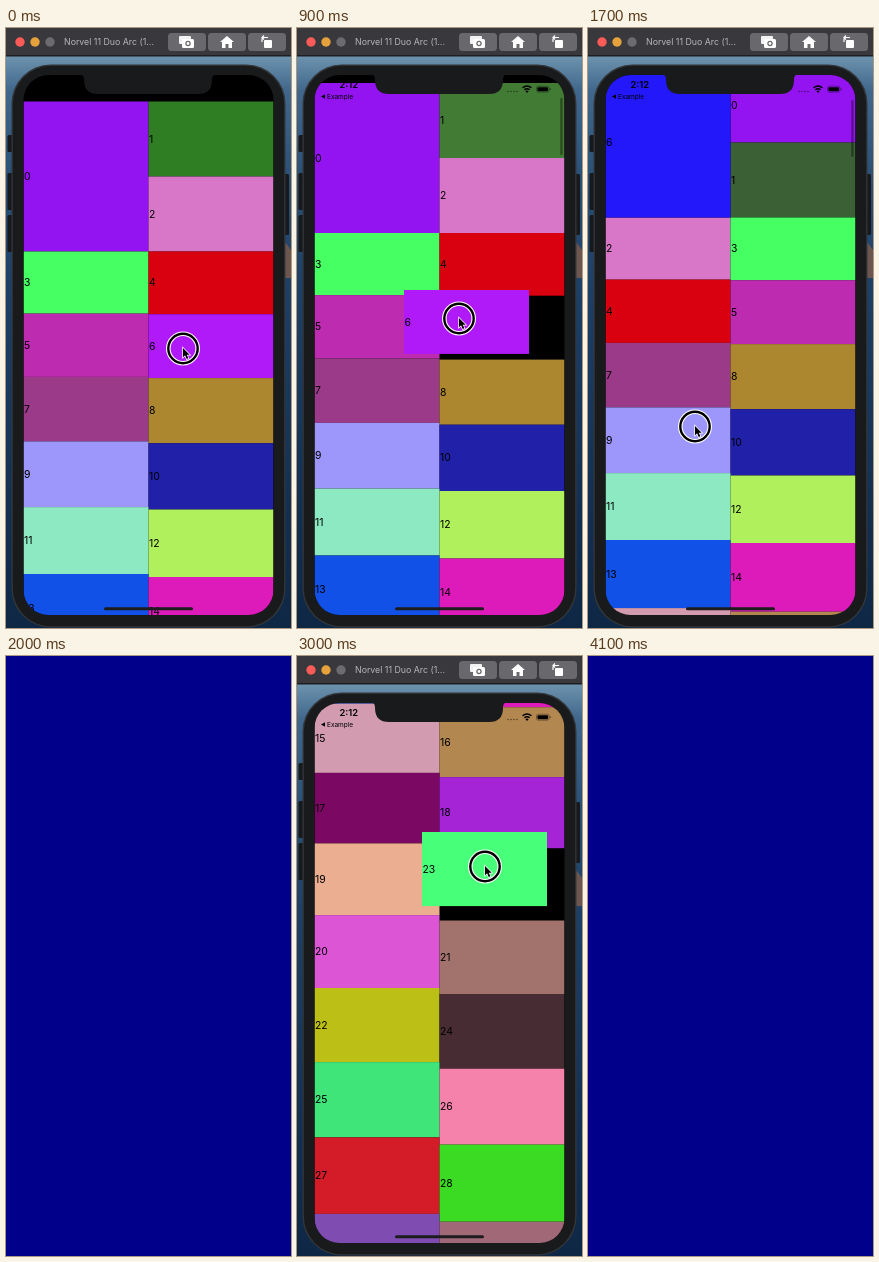
Animation of 285 by 600 pixels, one loop 5.1 s. Source, as an HTML page with a canvas:

```html
<!DOCTYPE html>
<html lang="en">
<head>
<meta charset="utf-8">
<title>Grid reorder</title>
<style>
html, body { margin: 0; overflow: hidden; background: #00008b; }
canvas { display: block; }
</style>
</head>
<body>
<canvas id="stage" width="285" height="600"></canvas>
<script>
const g = document.getElementById('stage').getContext('2d');
const FONT = 'Inter, Roboto, sans-serif';
const LOOP = 5100, LEFT = 17.5, COL = 125;

const colors = ('9314f0 2f7e24 d877c8 46ff63 d9000f bd2bb0 b01af8 9c3a8a ac8730 9d97fc 2120a8 ' +
  '8ce9c2 b0f05d 1151e8 dd1bbb d29bb0 b28750 7b0863 a424d6 ecae90 dc55d5 a2736c bcc016 48ff7a ' +
  '472c34 40e57a f582ab d31c28 3adb22 7f4cb2 a16878').split(' ').map(c => '#' + c);

// Keyframes are [time, value, value, ...]
function track(keys, t) {
  if (t <= keys[0][0]) return keys[0].slice(1);
  for (let i = 1; i < keys.length; i++) {
    const a = keys[i - 1], b = keys[i];
    if (t <= b[0]) {
      const k = (t - a[0]) / (b[0] - a[0]);
      return a.slice(1).map((v, j) => v + (b[j + 1] - v) * k);
    }
  }
  return keys[keys.length - 1].slice(1);
}

function move(list, id, to) {
  const rest = list.filter(v => v !== id);
  rest.splice(to, 0, id);
  return rest;
}

const initial = colors.map((c, i) => i);
const firstMove = move(initial, 6, 0);
const secondMove = move(firstMove, 23, 20);

// Cell of the two-column layout: x, y, height
function cell(p) {
  if (p === 0) return [LEFT, 0, 150];
  if (p < 3) return [LEFT + COL, (p - 1) * 75, 75];
  const first = p % 2 ? 3 : 4, n = (p - first) / 2;
  return [p % 2 ? LEFT : LEFT + COL, 150 + n * (60.3 + 0.6 * (first + n - 1)), 60.3 + 0.6 * p];
}

const scenes = [
  {
    from: 0, to: 2000, item: 6, before: initial, after: firstMove, dropped: '#2218fa',
    lift: 400, drop: 1400, press: 1600, reflow: [[1100, 0], [1300, 1]],
    scroll: [[300, 73.5], [900, 55], [1400, 39.5], [1700, 39.5], [1800, 0], [1900, -90]],
    pointer: [[400, 177, 320], [900, 162, 290], [1200, 85, 125], [1400, 80, 115], [1700, 107, 398], [1900, 107, 268]],
    drag: [[400, 142.5, 286], [900, 107, 262], [1200, 30, 97], [1400, 20, 80]],
    bar: t => t >= 400
  },
  {
    from: 2700, to: 4100, item: 23, before: firstMove, after: secondMove, dropped: '#a2d53a',
    lift: 2700, drop: 3200, press: Infinity, reflow: [[2800, 0], [3000, 1]],
    scroll: [[2700, -493]],
    pointer: [[2700, 80, 366], [3000, 188, 210], [3200, 196, 224], [3300, 196, 224], [3700, 206, 445]],
    drag: [[2700, 17.5, 332], [3000, 125, 176], [3200, 133, 190]],
    bar: () => false
  }
];

function box(x, y, w, h, r, fill) {
  g.beginPath();
  g.roundRect(x, y, w, h, r);
  g.fillStyle = fill;
  g.fill();
}

function disc(x, y, r, fill) {
  g.beginPath();
  g.arc(x, y, r, 0, 7);
  g.fillStyle = fill;
  g.fill();
}

function line(path, color, width) {
  g.strokeStyle = color;
  g.lineWidth = width;
  g.stroke(new Path2D(path));
}

function shape(path, fill) {
  g.fillStyle = fill;
  g.fill(new Path2D(path));
}

function text(s, x, y, size, fill = '#000', weight = 400) {
  g.font = `${weight} ${size}px ${FONT}`;
  g.textBaseline = 'middle';
  g.fillStyle = fill;
  g.fillText(s, x, y);
}

function tile(id, x, y, h, fill) {
  g.fillStyle = fill;
  g.fillRect(x, y, COL, h);
  text(id, x + 0.5, y + h / 2 + 0.5, 10.4);
}

function desktop() {
  const sky = g.createLinearGradient(0, 28, 0, 600);
  [[0, '#6d93ae'], [0.06, '#41688c'], [0.2, '#2c5278'], [0.4, '#1d4066'], [1, '#0e2745']]
    .forEach(s => sky.addColorStop(...s));
  g.fillStyle = sky;
  g.fillRect(0, 0, 285, 600);
  shape('M279 214L285 222V250H279Z', '#6d5650');
}

function titleBar() {
  box(0, 0, 285, 28, 0, '#39393d');
  box(0, 27, 285, 1.5, 0, '#1d1e22');
  ['#fc5b57', '#e5a13b', '#6c6c70'].forEach((c, i) => disc(14 + i * 15, 14, 4.7, c));
  text('Norvel 11 Duo Arc (1...', 58, 14.5, 8.8, '#b6b6ba');
  [162, 202, 242].forEach(x => box(x, 5, 38, 18, 3.5, '#69696d'));
  box(173, 8, 12, 8, 1, '#f2f2f2');
  box(176, 11, 12, 9, 1.5, '#fff');
  disc(182, 15.5, 2.7, '#69696d');
  disc(182, 15.5, 1.4, '#fff');
  shape('M221 8L228 14H226V20H222.5V16H219.5V20H216V14H214Z', '#fff');
  box(258, 12, 8, 8, 1, '#fff');
  line('M256 14V11Q256 9.5 258 9.5H262M258 7.5L256 9.5L258 11.5', '#fff', 1.2);
}

function phone() {
  [[107, 17], [145, 37], [187, 37]].forEach(([y, h]) => box(1.5, y, 6, h, 1.5, '#17191c'));
  box(277, 146, 6, 61, 1.5, '#17191c');
  box(5.5, 36.5, 274, 563, 39, '#34373a');
  box(6.8, 37.8, 271.4, 560.5, 38, '#191a1b');
}

function statusBar() {
  text('2:12', 42.5, 57, 9.4, '#000', 600);
  shape('M24 68.5L28 66.3V70.7Z', '#000');
  text('Example', 30, 68.8, 6.5);
  [211, 214, 217, 220].forEach(x => disc(x, 63.5, 0.7, 'rgba(0,0,0,.6)'));
  line('M225.5 59.8Q230 56 234.5 59.8M227.3 61.8Q230 59.5 232.7 61.8', '#000', 1.4);
  shape('M230 65L228.3 63Q230 61.8 231.7 63Z', '#000');
  g.beginPath();
  g.roundRect(239.5, 58.2, 12.5, 6, 1.8);
  g.strokeStyle = 'rgba(0,0,0,.5)';
  g.lineWidth = 0.7;
  g.stroke();
  box(240.5, 59.2, 10.5, 4, 1, '#000');
  box(252.8, 60.2, 0.9, 2, 0.5, 'rgba(0,0,0,.6)');
}

function pointer(x, y, pressed) {
  if (pressed) {
    for (const [color, width] of [['#fff', 4.6], ['#000', 2.4]]) {
      g.beginPath();
      g.arc(x, y + 0.5, 14.7, 0, 7);
      g.strokeStyle = color;
      g.lineWidth = width;
      g.stroke();
    }
  }
  g.save();
  g.translate(x, y);
  const arrow = 'M0 0V9.3L2.1 7.3L3.7 11L5.4 10.3L3.8 6.7H6.7Z';
  line(arrow, '#fff', 1.4);
  shape(arrow, '#000');
  g.restore();
}

function fillFor(id, s, t) {
  if (id === s.item && t >= s.drop) return s.dropped;
  if (id === 6 && s.from) return scenes[0].dropped;
  if (id === 1 && t >= 500) return t < s.drop ? '#427b33' : '#3b6036';
  if (id === 24 && t >= 3200) return '#4a1a2a';
  return colors[id];
}

function grid(s, t) {
  const [top] = track(s.scroll, t), [k] = track(s.reflow, t);
  const dragging = t >= s.lift && t < s.drop;
  for (const id of initial) {
    if (id === s.item && dragging) continue;
    const a = cell(s.before.indexOf(id)), b = cell(s.after.indexOf(id));
    const [x, y, h] = a.map((v, i) => v + (b[i] - v) * k);
    if (y + top < 600 && y + top + h > 40) tile(id, x, y + top, h, fillFor(id, s, t));
  }
  if (dragging) {
    const [x, y] = track(s.drag, t);
    tile(s.item, x, y, cell(s.item)[2], colors[s.item]);
  }
  if (s.bar(t)) box(263.3, 70 + (55 - top) * 0.13, 2.2, 57, 1.1, 'rgba(0,0,0,.4)');
}

function draw(t) {
  const s = scenes.find(v => t >= v.from && t < v.to);
  if (!s) return box(0, 0, 285, 600, 0, '#00008b');
  desktop();
  titleBar();
  phone();
  g.save();
  g.beginPath();
  g.roundRect(LEFT, 47, 2 * COL, 540, 25);
  g.clip();
  g.fillStyle = '#000';
  g.fillRect(0, 40, 285, 560);
  grid(s, t);
  statusBar();
  shape('M74 46H210Q206 47 206 51V52Q206 66 192 66H92Q78 66 78 52V51Q78 47 74 46Z', '#191a1b');
  box(98, 579.3, 89, 3, 1.5, '#1c1c1e');
  g.restore();
  pointer(...track(s.pointer, t), t < s.drop || t >= s.press);
}

const start = performance.now();
function frame() {
  const t = (performance.now() - start) % LOOP;
  draw(Math.floor(t / 100) * 100);
  requestAnimationFrame(frame);
}
frame();
</script>
</body>
</html>
```
